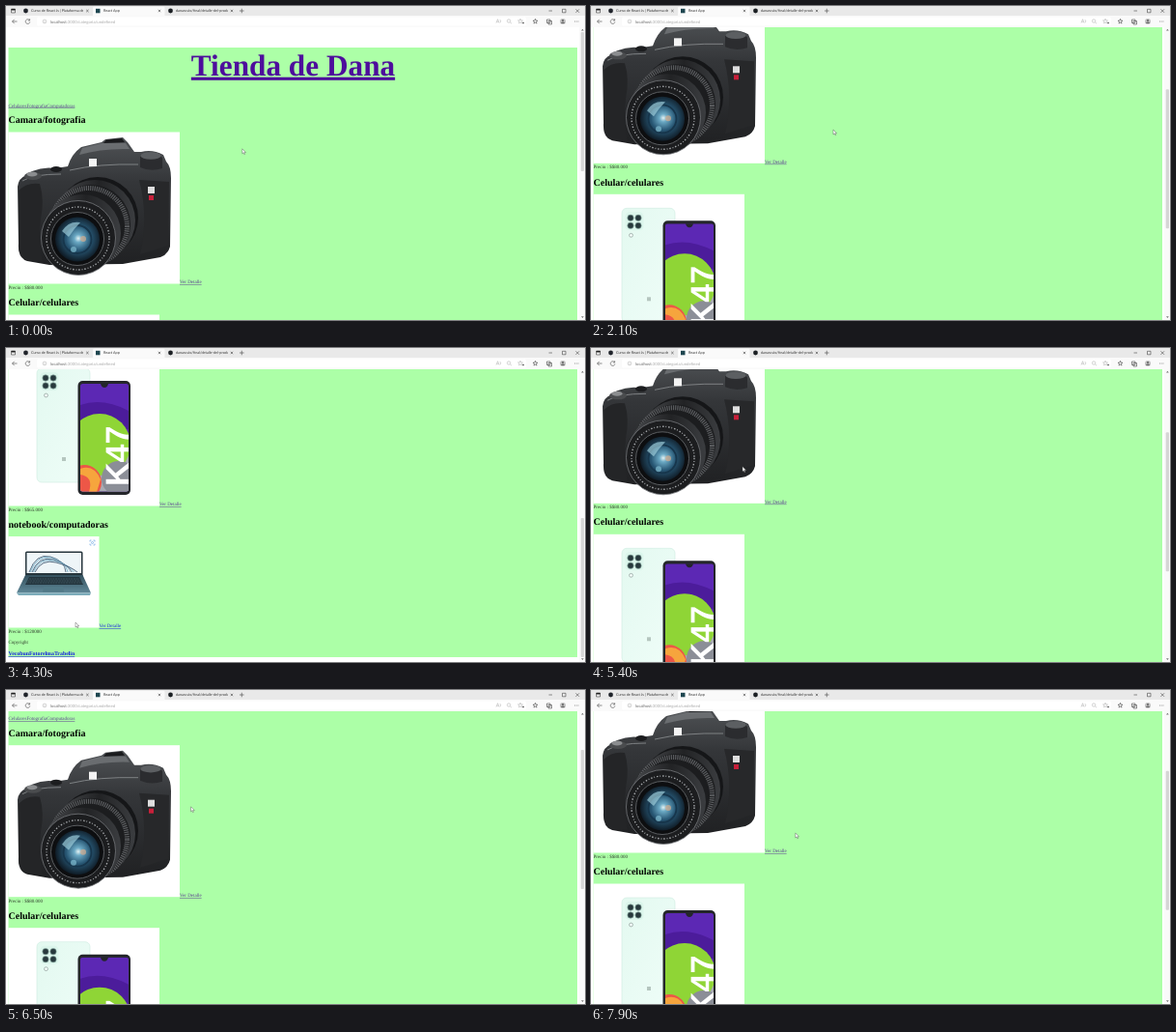
Write an HTML page that moves like this. It is 600 by 325 pixels and loops after 8 s.

```html
<!DOCTYPE html>
<html lang="es">
<head>
<meta charset="utf-8">
<title>Tienda</title>
<style>
  html, body { margin: 0; width: 100%; height: 100%; overflow: hidden; background: #fff; }
  svg { display: block; text-rendering: geometricPrecision; }
  #stage { width: 100vw; height: 100vh; }
  .ui { font: 3.75px Lato, "Open Sans", sans-serif; fill: #333; }
  .page { font: 5px "Liberation Serif", "Noto Serif", serif; fill: #2c382a; }
  .head { font-size: 10px; font-weight: bold; fill: #000; }
  .link { fill: #5b3d91; text-decoration: underline; }
  .title { font-size: 31.25px; font-weight: bold; text-anchor: middle; fill: #4d0d9c; }
  .new { fill: #1420e0; }
  .social { font-size: 5.85px; font-weight: bold; }
  .line { fill: none; stroke: #444; stroke-width: .6; }
  .pale { stroke: #b5b5b5; }
</style>
</head>
<body>
<svg id="stage" viewBox="0 0 600 325" preserveAspectRatio="none">
  <defs>
    <linearGradient id="body" x1="0" y1="0" x2="0" y2="1">
      <stop offset="0" stop-color="#505356"/><stop offset=".35" stop-color="#343639"/><stop offset="1" stop-color="#202123"/>
    </linearGradient>
    <linearGradient id="barrel">
      <stop offset="0" stop-color="#4b4d50"/><stop offset=".55" stop-color="#222325"/><stop offset="1" stop-color="#3b3d40"/>
    </linearGradient>
    <radialGradient id="glass" cx=".52" cy=".48" r=".55">
      <stop offset="0" stop-color="#e2f2f3"/><stop offset=".16" stop-color="#6ba9c4"/>
      <stop offset=".5" stop-color="#285774"/><stop offset="1" stop-color="#0c141c"/>
    </radialGradient>
    <linearGradient id="mint" x1="0" y1="0" x2="1" y2="1">
      <stop offset="0" stop-color="#e3f9f0"/><stop offset="1" stop-color="#effdf8"/>
    </linearGradient>
    <linearGradient id="deck" x1="0" y1="0" x2="0" y2="1">
      <stop offset="0" stop-color="#34505d"/><stop offset="1" stop-color="#5f8797"/>
    </linearGradient>
    <clipPath id="screen"><rect x="77" y="203" width="50" height="111.500" rx="2.500"/></clipPath>
  </defs>

  <rect width="600" height="325" fill="#fff"/>

  <svg class="page" y="22" width="594" height="303" viewBox="0 22 594 303">
    <g id="page">
      <rect x="2.500" y="43" width="589.500" height="590" fill="#acffa7"/>
      <text class="link title" x="297.500" y="71.700">Tienda de Dana</text>
      <text class="link" x="2.500" y="104.500">CelularesFotografiaComputadoras</text>

      <text class="head" x="2.500" y="121.300">Camara/fotografia</text>
      <rect x="2.500" y="130.500" width="177.500" height="157" fill="#fff"/>
      <g id="camera">
        <path fill="url(#body)" d="M12 187Q13 178 21 175L27 171Q39 166 51 168L64 166Q68 153 78 146L99 141L103 138L121 136L126 141L133 151L140 151Q152 148 163 154L166 161Q171 166 171 178L170 249Q168 257 160 260L121 267L45 268L22 264Q12 261 13 246Z"/>
        <path fill="#242527" d="M13 191Q22 182 35 184Q40 200 36 220Q33 244 38 264L22 263Q13 260 13 246Z"/>
        <path fill="#27282a" d="M138 180L169 182L168 248L139 257Q148 218 138 180Z"/>
        <path fill="#6a6d70" d="M79 147L99 142L124 142L128 148Q100 147 76 154Z"/>
        <path fill="#1a1b1d" d="M101 142L104 138.500L120 137L123 141Z"/>
        <path fill="none" stroke="#85888b" stroke-width=".9" d="M66 170Q96 163 137 164M17 181Q28 174 57 174"/>
        <ellipse cx="28" cy="176" rx="9" ry="4" fill="#4a4c4e"/>
        <ellipse cx="27" cy="174" rx="5.500" ry="2.500" fill="#8b8d8f"/>
        <path fill="#2b2c2f" d="M139 156Q150 149 162 157V168Q150 172 139 167Z"/>
        <ellipse cx="150" cy="155" rx="10.500" ry="3.800" fill="#5c5f62"/>
        <ellipse cx="52" cy="169" rx="6" ry="3" fill="#1c1d1f"/>
        <rect x="86" y="158" width="8" height="8" fill="#f4f4f4"/>
        <rect x="147" y="187" width="7" height="7" fill="#dedede"/>
        <rect x="148" y="196" width="5" height="5" fill="#c8203a"/>
        <circle cx="95" cy="219" r="42" fill="#151618"/>
        <circle cx="92" cy="222" r="42" fill="url(#barrel)"/>
        <circle cx="88" cy="226" r="41" fill="#1c1d1f"/>
        <circle cx="86" cy="228" r="39.500" fill="none" stroke="#5a5c5f" stroke-width="5" stroke-dasharray="1.200 1"/>
        <circle cx="79" cy="235" r="40" fill="url(#barrel)"/>
        <circle cx="75" cy="240" r="38.500" fill="#1c1d1f" stroke="#75787b" stroke-width=".8"/>
        <circle cx="74.500" cy="240.500" r="32.500" fill="none" stroke="#a5a8ab" stroke-width="1.400" stroke-dasharray="1.500 1.800 .8 2"/>
        <circle cx="74" cy="241" r="27.500" fill="#0d0e10" stroke="#5a5d60" stroke-width="1"/>
        <circle cx="74" cy="241.500" r="23" fill="url(#glass)"/>
        <circle cx="74" cy="241.500" r="14.500" fill="none" stroke="#17364c" stroke-width="1.800"/>
        <path fill="#a5d4e1" opacity=".65" d="M58 233Q65 222 77 224Q70 231 65 239Z"/>
        <circle cx="80" cy="241" r="3" fill="#d5ad8d" opacity=".7"/>
        <circle cx="70" cy="252" r="3" fill="#82bed1" opacity=".7"/>
      </g>
      <text class="link" x="180" y="287.300">Ver Detalle</text>
      <text x="2.500" y="293">Precio : $$80.000</text>

      <text class="head" x="2.500" y="310.200">Celular/celulares</text>
      <rect x="2.500" y="319.500" width="156.500" height="157" fill="#fff"/>
      <g id="phone" transform="translate(0 147)">
        <rect x="32" y="187" width="55" height="118" rx="5" fill="url(#mint)" stroke="#cdebe0" stroke-width=".6"/>
        <rect x="35.500" y="191" width="19" height="19" rx="4.500" fill="#dbf5eb"/>
        <g fill="#27383c" stroke="#8fb3a8" stroke-width=".6">
          <circle cx="41" cy="197" r="3.200"/><circle cx="49" cy="197" r="3.200"/>
          <circle cx="41" cy="205" r="3.200"/><circle cx="49" cy="205" r="3.200"/>
        </g>
        <circle cx="41.500" cy="215" r="1.900" fill="#f5fffb" stroke="#8b9a95" stroke-width=".7"/>
        <rect x="58" y="279" width="4" height="4" fill="#b5c6bf"/>
        <rect x="74.500" y="200" width="54.500" height="118" rx="5" fill="#24262a"/>
        <g clip-path="url(#screen)">
          <rect x="77" y="203" width="50" height="112" fill="#5c28b4"/>
          <path fill="#4c1c9b" d="M77 225Q100 217 127 231V250H77Z"/>
          <rect x="77" y="262" width="50" height="53" fill="#a9abb4"/>
          <circle cx="97" cy="266" r="32" fill="#8fd536"/>
          <circle cx="117" cy="301" r="18" fill="#8b8e97"/>
          <circle cx="81" cy="305" r="18" fill="#ed5747"/>
          <path fill="#f6a53d" d="M77 291Q91 286 98 302L94 315H86Q91 299 77 297Z"/>
          <text transform="translate(126.500 309) rotate(-90)" fill="#fff" style="font:bold 34px 'Liberation Sans',sans-serif">K47</text>
        </g>
        <path fill="#24262a" d="M98 203H106Q105 207 102 207Q99 207 98 203Z"/>
      </g>
      <text class="link" x="159" y="476.300">Ver Detalle</text>
      <text x="2.500" y="482">Precio : $$65.000</text>

      <text class="head" x="2.500" y="499.300">notebook/computadoras</text>
      <rect x="2.500" y="508" width="94" height="94.500" fill="#fff"/>
      <g id="laptop" transform="translate(0 299)">
        <path fill="#26353c" d="M20 226Q20 224.500 21.500 224.500H78Q79.500 224.500 79.500 226V250H20Z"/>
        <path fill="#eef5f8" d="M21.500 226H78V247H21.500Z"/>
        <g id="swirl" fill="none" stroke-width=".7"></g>
        <path fill="url(#deck)" d="M20 249H79.500L88 267.500H11Z"/>
        <path fill="#22343d" d="M24 251H76L80 259H20Z"/>
        <path stroke="#68818b" stroke-width=".4" stroke-dasharray="2 .7" d="M24 253H76M22.500 255H77.500M21.500 257H79"/>
        <path fill="#527987" d="M39 261H59L60 266.500H38Z"/>
        <path fill="#7dacba" d="M11 267.500H88L87 270H13Z"/>
      </g>
      <g id="lens" fill="none" stroke="#5b9be0" stroke-width=".6">
        <path d="M87 513.500V512H88.500M90.500 512H92V513.500M92 515.500V517H90.500M88.500 517H87V515.500"/>
        <circle cx="89.500" cy="514.500" r="1"/>
      </g>
      <text class="link new" x="96.500" y="602.300">Ver Detalle</text>
      <text x="2.500" y="608">Precio : $120000</text>
      <text x="2.500" y="618.500">Copyright</text>
      <text class="link new social" x="2.500" y="631">VecobunFotorelmaTrabelin</text>
    </g>
  </svg>

  <rect x="594" y="22" width="6" height="303" fill="#fafafa"/>
  <rect id="thumb" x="595.700" y="27" width="3.300" height="144" rx="1" fill="#d6d6d6"/>
  <path fill="#777" d="M597.400 23.800L598.800 25.600H596ZM597.400 323L598.800 321.200H596Z"/>

  <g class="ui">
    <rect width="600" height="10.500" fill="#e9e9e9"/>
    <rect y="10" width="600" height="12" fill="#fafafa"/>
    <path fill="#fafafa" d="M90 10.500V2Q90 .8 91.500 .8H163Q164.500 .8 164.500 2V10.500Z"/>
    <path class="line" d="M5.500 3H9.500V7H5.500Z"/>
    <path fill="#222" d="M5.500 3H9.500V4.500H5.500Z"/>
    <circle cx="20.500" cy="5" r="2.400" fill="#20242b"/>
    <rect x="93" y="2.800" width="4.500" height="4.500" fill="#1f4650"/>
    <circle cx="170.500" cy="5" r="2.400" fill="#1b1f23"/>
    <svg x="26" width="54" height="10"><text y="6.300">Curso de React Js | Plataforma de</text></svg>
    <text x="101" y="6.300">React App</text>
    <svg x="176" width="54" height="10"><text y="6.300">danaruvio/final/detalle-del-producto</text></svg>
    <path class="line" d="M83.200 3.800L85.600 6.200M85.600 3.800L83.200 6.200M157.800 3.800L160.200 6.200M160.200 3.800L157.800 6.200M232.800 3.800L235.200 6.200M235.200 3.800L232.800 6.200M242 5H246.600M244.300 2.700V7.300"/>
    <path class="line" d="M562.500 5H566M576.500 3.300H580V6.800H576.500ZM590.500 3.300L594 6.800M594 3.300L590.500 6.800"/>

    <rect x="32" y="11.500" width="507" height="9" rx="1.500" fill="#fff"/>
    <path class="line" d="M11.500 16H6.500M8.700 13.800L6.500 16L8.700 18.200M24.300 14.600A2.300 2.300 0 1 0 24.800 16.500M24.600 13.300V15H22.900"/>
    <g class="line pale">
      <circle cx="40" cy="16" r="1.900"/><path d="M40 15.500V17.300"/>
      <path d="M508 17.500L509.500 13.700L511 17.500M508.600 16.300H510.400M512 14.200Q513.300 15.800 512 17.300"/>
      <circle cx="521" cy="15.500" r="1.700"/><path d="M522.300 16.800L524 18.300"/>
    </g>
    <text x="46" y="17.500" style="font-size:4.250px;fill:#aaa"><tspan fill="#666">localhost</tspan>:3000/categoria/undefined</text>
    <path id="favorite" class="line pale"/>
    <path id="favorites" class="line"/>
    <path class="line" d="M535 17.500H537M536 16.500V18.500M560.500 14H564V17.500H560.500ZM562 15.500H565.500V19H562Z"/>
    <circle cx="577" cy="16" r="3" fill="#c2c2c2"/>
    <circle cx="577" cy="15" r="1.100" fill="#666"/>
    <path fill="#666" d="M575 18Q575 16.500 577 16.500T579 18Z"/>
    <path stroke="#666" stroke-width=".8" stroke-dasharray=".8 1" d="M589 16H594"/>
  </g>

  <path id="cursor" fill="#fff" stroke="#555" stroke-width=".45" d="M0 0V5L1.200 4L2 5.800L2.800 5.500L2 3.700H3.700Z"/>
</svg>
<script>
  const $ = id => document.getElementById(id);
  const LOOP = 8000, STEP = 100;

  // [ms, scroll]
  const scrollKeys = [[0, 0], [1700, 0], [2600, 299], [2800, 299], [3200, 313], [4800, 313],
    [5800, 25.5], [6200, 25.5], [6900, 147], [7400, 147], [7900, 119]];
  // [ms, x, y]
  const cursorKeys = [[0, 244.8, 147.8], [900, 190, 130], [1100, 190, 130], [1500, 182.8, 127],
    [2200, 255, 128], [2700, 261, 126], [3700, 80, 276], [4300, 72, 284], [4800, 76, 278],
    [5600, 172, 94], [6000, 175.300, 88.300], [7000, 207.800, 153.300], [7900, 211.800, 148]];

  function sample(keys, t) {
    const i = keys.findIndex(k => k[0] > t);
    if (i < 0) return keys[keys.length - 1].slice(1);
    const [a, b] = [keys[i - 1], keys[i]];
    const p = (t - a[0]) / (b[0] - a[0]);
    const e = p * p * (3 - 2 * p);
    return a.slice(1).map((v, n) => v + (b[n + 1] - v) * e);
  }

  function star(x, y) {
    const points = Array.from({ length: 10 }, (_, i) => {
      const r = i % 2 ? 1.1 : 2.6, a = i * Math.PI / 5 - Math.PI / 2;
      return `${x + r * Math.cos(a)} ${y + r * Math.sin(a)}`;
    });
    return `M${points.join("L")}Z`;
  }
  $("favorite").setAttribute("d", star(533, 15.8));
  $("favorites").setAttribute("d", star(548.5, 16));

  // Ribbon of nested waves on the laptop display
  $("swirl").innerHTML = Array.from({ length: 7 }, (_, i) =>
    `<path stroke="${["#243b56", "#5b9dbb", "#a9cbda"][i % 3]}" d="M${24 + i} 246Q${31 + i} ${226 + i} ${46 + i} ${230 + i}T${62 + i * 2} 246"/>`
  ).join("");

  function draw(now) {
    const t = Math.floor(now % LOOP / STEP) * STEP;
    const [scroll] = sample(scrollKeys, t);
    const [x, y] = sample(cursorKeys, t);
    const docY = y + scroll;
    const hover = x > 2.5 && x < 96.5 && docY > 508 && docY < 602.5;
    $("page").setAttribute("transform", `translate(0 ${-scroll})`);
    $("thumb").setAttribute("y", 27 + scroll * 149 / 313);
    $("cursor").setAttribute("transform", `translate(${x} ${y})`);
    $("lens").setAttribute("visibility", hover ? "visible" : "hidden");
  }

  const start = performance.now();
  function tick() {
    draw(performance.now() - start);
    requestAnimationFrame(tick);
  }
  tick();
</script>
</body>
</html>
```
